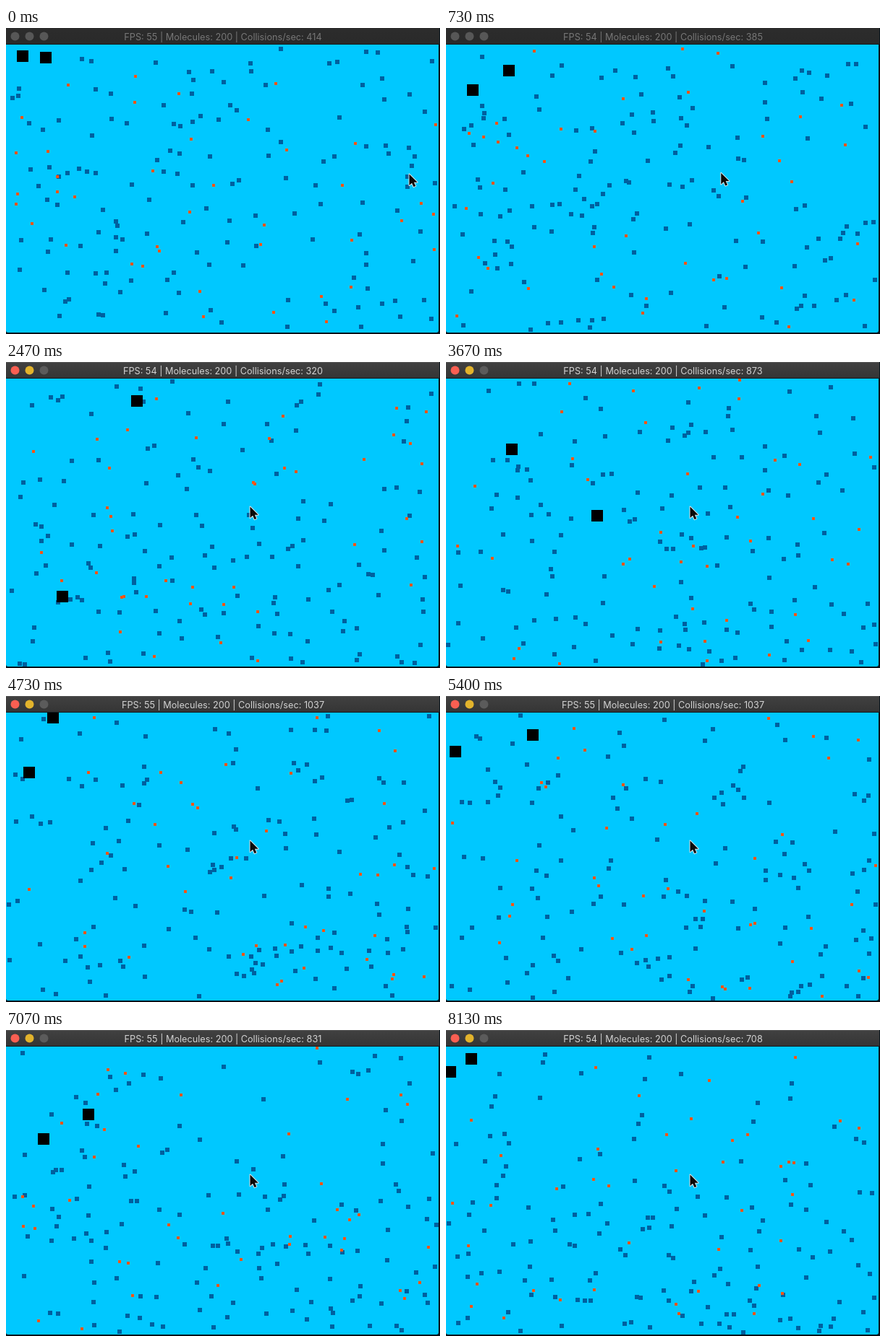
Animation of 600 by 424 pixels, one loop 8.2 s. Source, as an HTML page with a canvas:

```html
<!DOCTYPE html>
<html lang="en">
<head>
<meta charset="utf-8">
<title>Molecules</title>
<style>
  html, body { margin: 0; width: 100%; height: 100%; overflow: hidden; background: #08131a; }
  canvas { display: block; width: 600px; height: 424px; }
</style>
</head>
<body>
<canvas width="600" height="424"></canvas>
<script>
const ctx = document.querySelector('canvas').getContext('2d');
const LOOP = 8200, FRAMES = 123, SUBSTEPS = 4, DT = 1 / 60;
const BOX = { left: 0, top: 23, right: 598, bottom: 422 };
const GRAVITY = 25;

// Waypoints are [ms, x, y].
const heavyPaths = [
  [[0, 23, 39], [500, 58, 78], [1000, 14, 96], [1400, 32, 133], [2470, 78, 326],
   [2830, 118, 413], [3670, 209, 212], [4730, 32, 106], [5250, 9, 72], [6070, 29, 100],
   [6900, 60, 168], [7500, 30, 108], [8130, 6, 58]],
  [[0, 55, 41], [600, 92, 64], [1400, 62, 32], [2470, 181, 54], [3000, 168, 98],
   [3670, 91, 121], [4730, 65, 30], [5300, 112, 48], [6070, 176, 92], [7100, 112, 118],
   [8130, 35, 40]]
];
const cursorPath = [[0, 557, 202], [250, 557, 202], [850, 337, 200], [8200, 337, 200]];
const FOCUS_AT = 1130;

const fps = [55, 54, 54, 54, 54, 55, 55, 55, 54];
const collisions = [414, 385, 352, 320, 873, 1037, 957, 831, 708];

let seed = 2024;
function random() {
  seed = (seed * 1664525 + 1013904223) % 4294967296;
  return seed / 4294967296;
}
const between = (a, b) => a + (b - a) * random();

function along(path, t) {
  let i = 1;
  while (i < path.length - 1 && path[i][0] < t) i++;
  const [t0, x0, y0] = path[i - 1], [t1, x1, y1] = path[i];
  const k = Math.min(1, (t - t0) / (t1 - t0));
  return { x: x0 + (x1 - x0) * k, y: y0 + (y1 - y0) * k };
}

function molecule(size, color, minSpeed, maxSpeed) {
  const angle = between(0, 2 * Math.PI), speed = between(minSpeed, maxSpeed);
  return {
    size, color, mass: size * size,
    x: between(4, 594), y: between(27, 418),
    vx: speed * Math.cos(angle), vy: speed * Math.sin(angle)
  };
}

function bounceOffWalls(m) {
  const r = m.size / 2;
  if (m.x < BOX.left + r) { m.x = BOX.left + r; m.vx = Math.abs(m.vx); }
  if (m.x > BOX.right - r) { m.x = BOX.right - r; m.vx = -Math.abs(m.vx); }
  if (m.y < BOX.top + r) { m.y = BOX.top + r; m.vy = Math.abs(m.vy); }
  if (m.y > BOX.bottom - r) { m.y = BOX.bottom - r; m.vy = -Math.abs(m.vy); }
}

function bounceOffHeavy(m, h) {
  const dx = m.x - h.x, dy = m.y - h.y, reach = 8 + m.size / 2;
  if (Math.abs(dx) >= reach || Math.abs(dy) >= reach) return;
  if (Math.abs(dx) > Math.abs(dy)) {
    m.x = h.x + Math.sign(dx) * reach;
    m.vx = Math.sign(dx) * Math.abs(m.vx);
  } else {
    m.y = h.y + Math.sign(dy) * reach;
    m.vy = Math.sign(dy) * Math.abs(m.vy);
  }
}

// Elastic collision along the line between the two centres.
function collide(a, b) {
  const dx = b.x - a.x, dy = b.y - a.y, d2 = dx * dx + dy * dy;
  const reach = (a.size + b.size) / 2;
  if (d2 >= reach * reach || d2 === 0) return;
  const approach = (b.vx - a.vx) * dx + (b.vy - a.vy) * dy;
  if (approach >= 0) return;
  const j = 2 * approach / (d2 * (a.mass + b.mass));
  a.vx += j * b.mass * dx; a.vy += j * b.mass * dy;
  b.vx -= j * a.mass * dx; b.vy -= j * a.mass * dy;
}

const molecules = [];
for (let i = 0; i < 142; i++) molecules.push(molecule(6, '#00609f', 50, 190));
for (let i = 0; i < 41; i++) molecules.push(molecule(4, '#ff5412', 100, 290));

function step(t) {
  const heavy = heavyPaths.map(path => along(path, t));
  for (const m of molecules) {
    m.vy += GRAVITY * DT;
    m.x += m.vx * DT;
    m.y += m.vy * DT;
    heavy.forEach(h => bounceOffHeavy(m, h));
    bounceOffWalls(m);
  }
  molecules.forEach((a, i) => {
    for (let j = i + 1; j < molecules.length; j++) collide(a, molecules[j]);
  });
}

// The whole run is computed once, so each picture depends on time alone.
const history = [];
for (let f = 0; f < FRAMES; f++) {
  history.push(molecules.map(m => [m.x, m.y]));
  for (let s = 0; s < SUBSTEPS; s++) step((f * SUBSTEPS + s) * DT * 1000);
}

function square(x, y, size, color) {
  ctx.fillStyle = color;
  ctx.fillRect(Math.round(x - size / 2), Math.round(y - size / 2), size, size);
}

function drawContent(frame, t) {
  ctx.save();
  ctx.beginPath();
  ctx.roundRect(BOX.left, BOX.top, BOX.right, BOX.bottom - BOX.top, [0, 0, 3, 3]);
  ctx.clip();
  ctx.fillStyle = '#00c8ff';
  ctx.fillRect(0, 0, 600, 424);
  history[frame].forEach(([x, y], i) => square(x, y, molecules[i].size, molecules[i].color));
  for (const path of heavyPaths) {
    const { x, y } = along(path, t);
    square(x, y, 16, '#000');
  }
  ctx.restore();
}

function drawTitleBar(t) {
  const focused = t >= FOCUS_AT;
  const shade = ctx.createLinearGradient(0, 0, 0, 22);
  shade.addColorStop(0, focused ? '#414141' : '#2c2c2c');
  shade.addColorStop(1, focused ? '#353535' : '#2a2a2a');
  ctx.fillStyle = shade;
  ctx.fillRect(0, 0, 599, 22);
  if (focused) {
    ctx.fillStyle = '#5a5a5a';
    ctx.fillRect(0, 0, 599, 1);
  }
  ctx.fillStyle = '#101a1e';
  ctx.fillRect(0, 22, 599, 1);

  const lights = focused ? ['#f95f52', '#e2b32c', '#5b5b5b'] : Array(3).fill('#575757');
  lights.forEach((color, i) => {
    ctx.fillStyle = color;
    ctx.beginPath();
    ctx.arc(12.5 + i * 20, 11.5, 6, 0, 2 * Math.PI);
    ctx.fill();
  });

  const n = Math.floor((t + 570) / 1000);
  ctx.fillStyle = focused ? '#d2d2d2' : '#777';
  ctx.font = '12.7px Inter, Roboto, sans-serif';
  ctx.textAlign = 'center';
  ctx.fillText(`FPS: ${fps[n]} | Molecules: 200 | Collisions/sec: ${collisions[n]}`, 300, 16.5);
}

const arrow = new Path2D('M0 0V15.5L3.6 12.2L6 17.6L8.8 16.4L6.4 11.2H11.2Z');
function drawCursor(t) {
  const { x, y } = along(cursorPath, t);
  ctx.save();
  ctx.translate(x + 0.5, y + 0.5);
  ctx.strokeStyle = '#d8e4ea';
  ctx.lineWidth = 2;
  ctx.lineJoin = 'round';
  ctx.stroke(arrow);
  ctx.fillStyle = '#0a0a0a';
  ctx.fill(arrow);
  ctx.restore();
}

// Fifteen pictures a second, each starting on a multiple of 10 ms.
function frameAt(t) {
  const k = Math.ceil(t * 0.015);
  return Math.round(k * 20 / 3) * 10 > t ? k - 1 : k;
}

function draw(now) {
  const frame = frameAt(now % LOOP), t = frame * 200 / 3;
  ctx.fillStyle = '#08131a';
  ctx.fillRect(0, 0, 600, 424);
  drawContent(frame, t);
  drawTitleBar(t);
  drawCursor(t);
}

const start = performance.now();
function tick() {
  draw(performance.now() - start);
  requestAnimationFrame(tick);
}
tick();
</script>
</body>
</html>
```
